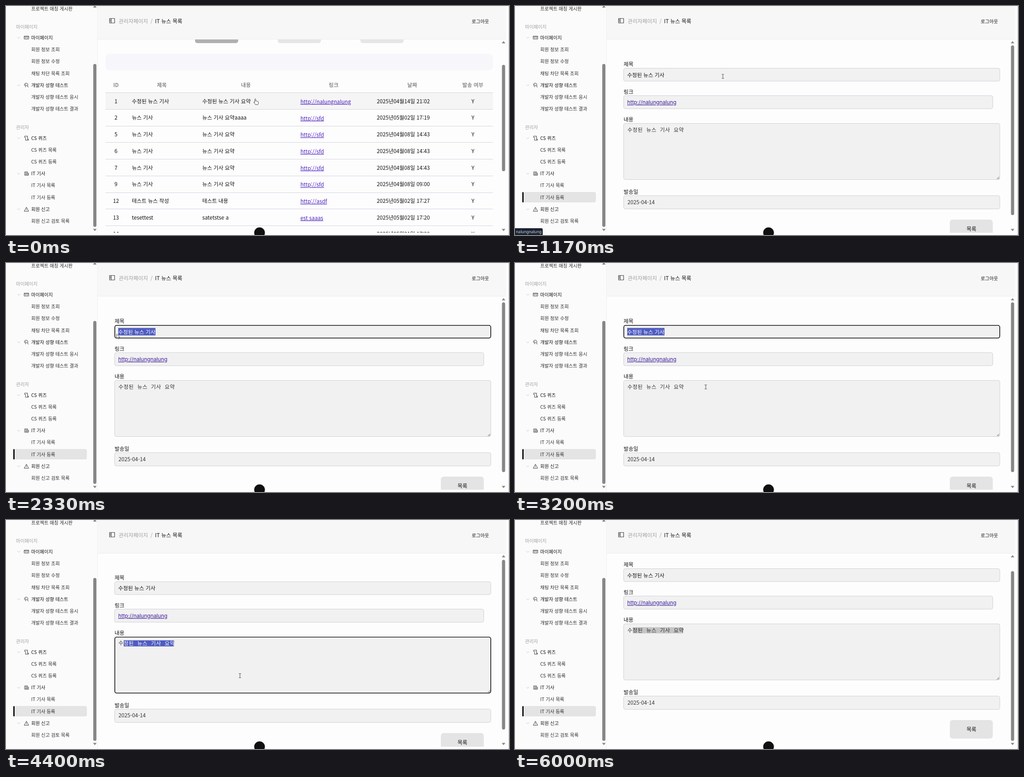
An HTML page for the animation above (6.03 s loop, 1107 by 506 pixels).

```html
<!DOCTYPE html>
<html lang="ko">
<head>
<meta charset="utf-8">
<title>IT 뉴스 목록</title>
<style>
html, body { margin: 0; width: 100%; height: 100%; overflow: hidden; background: #fdfdfd; }
#stage { display: block; width: 1107px; height: 506px; font: 11.7px "Noto Sans CJK KR", "Noto Sans CJK JP", sans-serif; fill: #111; }
text { white-space: pre; }
.sm { font-size: 10.3px; }
.med { font-weight: 500; }
.bold { font-weight: 700; fill: #8c8c8c; }
.gray { fill: #a0a0a0; }
.item { fill: #2c2c2c; }
.mid { text-anchor: middle; }
.link { fill: #4a1fc0; text-decoration: underline; }
.inter { font-family: Inter, sans-serif; fill: #3f1d9a; }
.thin { font-weight: 300; fill: #333; }
.wide { letter-spacing: .5px; word-spacing: 3.9px; }
.tip { font: 8.6px "Noto Sans", sans-serif; fill: #d5d9df; }
.field { fill: #f1f1f1; stroke: #d0d0d8; }
.ring { fill: none; stroke: #111; stroke-width: 1.6; }
.thumb { fill: #878787; }
.icon { fill: none; stroke: #444; }
.chev { fill: none; stroke: #c4c4c4; }
.mark { fill: #4f5cc0; }
.mark + text { fill: #fff; }

.step { animation: 6.03s step-end infinite; }
#list { animation-name: list; }
#detail { animation-name: detail; }
#tip { animation-name: tip; }
#ring1, #sel1 { animation-name: title; }
#ring2 { animation-name: area; }
#sel2 { animation-name: areaSel; }
#sel2 .mark { animation-name: dimMark; }
#sel2 text { animation-name: dimText; }
#hand { animation-name: hand; }
#beam { animation-name: beam; }
#arrow { animation-name: arrow; }
#tint { animation: tint 6.03s linear infinite; }
#scroll { animation: scroll 6.03s linear infinite; }
#bar { animation: bar 6.03s linear infinite; }
#drag1 { animation: drag1 6.03s linear infinite; }
#drag2 { animation: drag2 6.03s linear infinite; }
#cursor { animation: cursor 6.03s linear infinite; }

@keyframes list { 0% { visibility: visible } 5.47%, to { visibility: hidden } }
@keyframes detail { 0% { visibility: hidden } 5.47%, to { visibility: visible } }
@keyframes tip { 0%, 23.2%, to { opacity: 0 } 8.6% { opacity: 1 } }
@keyframes title { 0%, 56.4%, to { opacity: 0 } 22.06% { opacity: 1 } }
@keyframes area { 0%, 96.2%, to { opacity: 0 } 56.4% { opacity: 1 } }
@keyframes areaSel { 0% { opacity: 0 } 56.4%, to { opacity: 1 } }
@keyframes dimMark { 0% { fill: #4f5cc0 } 96.2%, to { fill: #c4c4c4 } }
@keyframes dimText { 0% { fill: #fff } 96.2%, to { fill: #333 } }
@keyframes tint { 0%, 5.47% { opacity: 0 } 9.6%, to { opacity: 1 } }
@keyframes scroll { 0%, 72.64% { transform: none; animation-timing-function: ease-in-out } 75.1%, to { transform: translateY(-30px) } }
@keyframes bar { 0%, 72.64% { transform: none; animation-timing-function: ease-in-out } 75.1%, to { transform: translateY(26px) } }
@keyframes drag1 {
  0%, 30.98% { transform: translateX(329px); animation-timing-function: steps(9) }
  37.3%, to { transform: translateX(247px) }
}
@keyframes drag2 {
  0%, 58.4% { transform: translateX(370px); animation-timing-function: steps(10) }
  62.7%, to { transform: translateX(259px) }
}
@keyframes hand {
  0%, 46.5%, 89.2% { opacity: 1 }
  12.5%, 49.07%, 89.7%, to { opacity: 0 }
}
@keyframes beam {
  0%, 37.48%, 74.56%, 88.7%, 90.75%, to { opacity: 0 }
  16.78%, 51.8%, 86.6%, 90.23% { opacity: 1 }
}
@keyframes arrow {
  0%, 16.78%, 46.5%, 51.8%, 86.6%, 89.2%, 90.23% { opacity: 0 }
  12.5%, 37.48%, 49.07%, 74.56%, 88.7%, 89.7%, 90.75%, to { opacity: 1 }
}
@keyframes cursor {
  0%, 10.8% { transform: translate(550px, 211px); animation-timing-function: ease-in-out }
  18.2%, 22.06% { transform: translate(457.5px, 155.5px) }
  36.5% { transform: translate(250px, 157px) }
  38.2%, 43.1% { transform: translate(243.5px, 157.5px) }
  53.1%, 56.4% { transform: translate(420px, 274px) }
  62.7% { transform: translate(262px, 275px) }
  66.3%, 68.8% { transform: translate(346px, 324.5px) }
  78.8%, 86.2% { transform: translate(749.5px, 371px) }
  92.9%, to { transform: translate(763px, -25px) }
}
</style>
</head>
<body>
<svg id="stage" viewBox="0 0 1107 506">
  <defs>
    <clipPath id="view"><rect x="202" y="73" width="905" height="428"/></clipPath>
    <clipPath id="clip1"><rect id="drag1" y="130" width="400" height="40"/></clipPath>
    <clipPath id="clip2"><rect id="drag2" y="255" width="400" height="40"/></clipPath>
  </defs>
  <rect width="1107" height="506" fill="#fdfdfd"/>

  <g id="side">
    <rect width="201" height="506" fill="#fbfbfb"/>
    <path d="M201.5 0V506" stroke="#f0f0f0"/>
    <g id="detailMark">
      <g class="step" style="animation-name:detail">
        <rect id="tint" x="16" y="411" width="162" height="23" rx="4" fill="#e4e4e4"/>
        <rect x="16" y="411" width="3" height="23" rx="1.5"/>
      </g>
    </g>
    <rect class="thumb" x="192" y="128" width="7" height="360" rx="3.5"/>
    <path class="thumb" d="M191.500 3.500h8l-4-5zM191.500 492.500h8l-4 5z"/>
  </g>

  <g clip-path="url(#view)">
    <g id="list" class="step">
      <rect x="416" y="60" width="95" height="22" rx="5" fill="#b0b0b0"/>
      <rect x="598" y="60" width="95" height="22" rx="5" fill="#e6e6e6"/>
      <rect x="780" y="60" width="95" height="22" rx="5" fill="#e6e6e6"/>
      <rect x="219" y="105.500" width="852.500" height="36.500" rx="9" fill="#f6f6fb"/>
      <rect x="219" y="192" width="852.500" height="36" fill="#f5f5f5"/>
      <rect class="thumb" x="1091.500" y="130" width="7" height="235" rx="3.5"/>
    </g>
    <g id="detail" class="step">
      <g id="scroll">
        <rect class="field" x="239" y="137.500" width="828" height="28.500" rx="4"/>
        <rect class="field" x="239" y="198" width="812.500" height="29" rx="4"/>
        <rect class="field" x="239" y="259.500" width="828" height="124" rx="4"/>
        <rect class="field" x="239" y="419" width="828" height="29.500" rx="4"/>
        <path d="M1060.500 382.500l5-5M1063.500 382.500l2-2" stroke="#555"/>
        <rect x="957" y="472" width="94.500" height="41" rx="6" fill="#e4e4e4"/>
        <g id="form"></g>
        <g id="sel1" class="step"><g clip-path="url(#clip1)">
          <rect class="mark" x="247" y="143.500" width="82" height="16.500"/>
        </g></g>
        <g id="sel2" class="step"><g clip-path="url(#clip2)">
          <rect class="mark step" x="247" y="267" width="122.500" height="13.500"/>
        </g></g>
        <rect id="ring1" class="ring step" x="239.500" y="137.800" width="827.300" height="28" rx="4"/>
        <rect id="ring2" class="ring step" x="239.500" y="259.800" width="827.300" height="123.700" rx="4"/>
      </g>
      <rect id="bar" class="thumb" x="1091.500" y="87" width="7" height="375" rx="3.5"/>
    </g>
    <path class="thumb" d="M1091 82.500h8l-4-5zM1091 492.500h8l-4 5z"/>
  </g>

  <g id="head">
    <rect x="202" width="899" height="73" fill="#f7f7f7"/>
    <path d="M202 73.500H1101" stroke="#eee"/>
    <path class="icon" d="M228 27.500h11v10h-11zM231.500 27.500v10M228 30.500h3M228 33.500h3" stroke-width="1.200"/>
  </g>
  <path d="M1106.500 0V506" stroke="#c8c8c8"/>

  <circle cx="558" cy="501" r="12.500" fill="#ddd"/>
  <circle cx="558" cy="501" r="11.700" fill="#101010"/>

  <g id="tip" class="step">
    <path d="M0 491h58q3 0 3 3v12H0z" fill="#1a2332"/>
  </g>

  <g id="cursor" stroke-linejoin="round" stroke-linecap="round">
    <path id="hand" class="step" fill="#fff" stroke="#333" stroke-width=".9"
      d="M-2.500 1.500V-4.500q0-1.400 1.100-1.400t1.100 1.400V-1q1.800-.9 2.200.5q1.700-.6 2 .7q1.500-.4 1.500 1.100v2.500q0 1.700-1.300 3.200H-.8q-1-1.800-3.600-4.300q-.8-1.600 .6-1.600z"/>
    <path id="beam" class="step" fill="none" stroke="#444" d="M-2-4.500h1.500l.5.500l.5-.5H2M0-4V4M-2 4.500h1.500l.5-.5l.5.500H2"/>
    <path id="arrow" class="step" fill="#fff" stroke="#333" stroke-width=".9" d="M0 0v9.200l2.200-2l1.500 3.300l1.500-.7l-1.400-3.200h2.900z"/>
  </g>
</svg>
<script>
const NS = 'http://www.w3.org/2000/svg';
const $ = sel => document.querySelector(sel);

function add(parent, tag, attrs) {
  const el = document.createElementNS(NS, tag);
  for (const key in attrs) el.setAttribute(key, attrs[key]);
  return parent.appendChild(el);
}
// y is the visual middle of the line
function label(parent, x, y, str, cls = '') {
  add(parent, 'text', { x, y, dy: '.37em', class: cls }).textContent = str;
}

// Sidebar
const side = $('#side');
const menu = [
  [6, '프로젝트 매칭 게시판'],
  [46.5, '마이페이지', 'gray'],
  [70, '마이페이지', 'med'],
  [96.5, '회원 정보 조회'], [122.5, '회원 정보 수정'], [149, '채팅 차단 목록 조회'],
  [175, '개발자 성향 테스트', 'med'],
  [201.5, '개발자 성향 테스트 응시'], [227.5, '개발자 성향 테스트 결과'],
  [268.5, '관리자', 'gray'],
  [292, 'CS 퀴즈', 'med'],
  [318, 'CS 퀴즈 목록'], [344.5, 'CS 퀴즈 등록'],
  [370.5, 'IT 기사', 'med'],
  [396.5, 'IT 기사 목록'], [423, 'IT 기사 등록'],
  [449, '회원 신고', 'med'],
  [475.5, '회원 신고 검토 목록']
];
const icons = {
  70: 'M-5-3.500h10v6.500h-10zM-5-1.500h10M-3 1h2M1 1h2',
  175: 'M-2 4.500v-2.500q-3-1-2.500-4q1-3 4.500-2.500q3 0 3.500 3.500M-1.500-2.500a2 2 0 1 0 3 2.500M1 1l3.500 4M2-1l2 3',
  292: 'M-4-4.500h6.500v9h-5M-4-4.500v3h2v6M2.500 2h2v2.500h-2M0-2h1',
  370.5: 'M-4-4h6.500v7.500h-6.500zM2.500-1h2v4.500h-2M-2.500-2h3.500M-2.500 0h3.500M-2.500 2h3.500',
  449: 'M0-4.500l5 9h-10zM0-1.500v3M0 2.800v.6'
};
for (const [y, str, kind = 'item'] of menu) {
  label(side, kind === 'gray' ? 22 : 55.5, y, str, 'sm ' + kind);
  if (kind !== 'med') continue;
  add(side, 'path', { class: 'chev', d: `M25 ${y - 1.5}l3 3l3-3` });
  add(side, 'path', { class: 'icon', d: icons[y], transform: `translate(45 ${y})` });
}

// Header
const head = $('#head');
label(head, 248, 34, '관리자페이지', 'gray');
label(head, 318, 34, '/', 'gray');
label(head, 328, 34, 'IT 뉴스 목록', 'med');
label(head, 1025, 34, '로그아웃', 'sm med');

// News table
const list = $('#list');
const site = 'nalungnalung';
[[242, 'ID'], [343, '제목'], [528, '내용'], [721, '링크'], [894, '날짜'], [1027.5, '발송 여부']]
  .forEach(([x, str]) => label(list, x, 175, str, 'bold mid'));
const rows = [
  [1, '수정된 뉴스 기사', '수정된 뉴스 기사 요약', 'http://' + site, '04월14일 21:02'],
  [2, '뉴스 기사', '뉴스 기사 요약aaaa', 'http://sfd', '05월02일 17:19'],
  [5, '뉴스 기사', '뉴스 기사 요약', 'http://sfd', '04월08일 14:43'],
  [6, '뉴스 기사', '뉴스 기사 요약', 'http://sfd', '04월08일 14:43'],
  [7, '뉴스 기사', '뉴스 기사 요약', 'http://sfd', '04월08일 14:43'],
  [9, '뉴스 기사', '뉴스 기사 요약', 'http://sfd', '04월08일 09:00'],
  [12, '테스트 뉴스 작성', '테스트 내용', 'http://asdf', '05월02일 17:27'],
  [13, 'tesettest', 'satetstse a', 'est saaas', '05월02일 17:20'],
  [14, '', '', '', '05월21일 17:20']
];
rows.forEach(([id, title, body, url, date], i) => {
  const y = 210.3 + i * 36.72;
  add(list, 'path', { d: `M219 ${Math.round(y - 19) + .5}H1071.500`, stroke: '#d3d3e2' });
  label(list, 242, y, id, 'mid');
  label(list, 277, y, title);
  label(list, 432, y, body);
  label(list, 648, y + 1.2, url, 'link');
  label(list, 816, y, '2025년' + date);
  label(list, 1027.5, y, 'Y', 'mid');
});

// Article form
const form = $('#form');
const title = [247, 152.3, '수정된 뉴스 기사'];
const body = [247.5, 273.3, '수정된 뉴스 기사 요약'];
[[129, '제목'], [190, '링크'], [251, '내용'], [410.5, '발송일']]
  .forEach(([y, str]) => label(form, 239, y, str, 'med'));
label(form, ...title);
label(form, 247, 212.8, 'http://' + site, 'link inter');
label(form, ...body, 'thin wide');
label(form, 247.5, 433.3, '2025-04-14', 'thin');
label(form, 1004.5, 493, '목록', 'med mid');
label($('#sel1 g'), ...title);
label($('#sel2 g'), ...body, 'thin wide step');

label($('#tip'), 2, 499, site, 'tip');
</script>
</body>
</html>
```
